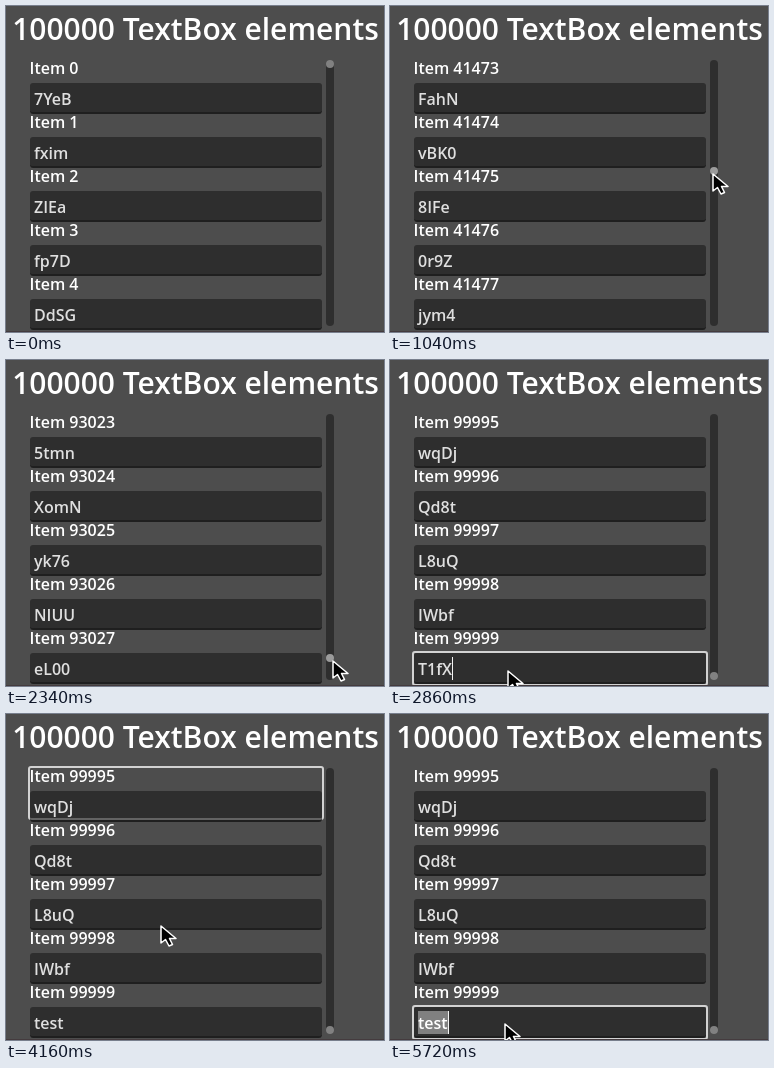
Write an HTML page that moves like this. It is 378 px wide and 326 px high and loops after 5980 ms.

```html
<!DOCTYPE html>
<html lang="en">
<head>
<meta charset="utf-8">
<title>100000 TextBox elements</title>
<style>
  html, body { margin: 0; width: 100%; height: 100%; overflow: hidden; background: #4d4d4d; }
  svg { display: block; width: 378px; height: 326px; }
  text { font: 600 16px "Open Sans", "Noto Sans", sans-serif; fill: #fff; white-space: pre; }
  .title { font-size: 30px; text-anchor: middle; }
  .value { fill: #dfdfdf; }
  .field { fill: rgba(26, 26, 26, .6); }
  .edge { fill: rgba(0, 0, 0, .6); }
  .focus { fill: none; stroke: rgba(255, 255, 255, .75); stroke-width: 2; }
  .mark { fill: #808080; }
  .caret { fill: #f2f2f2; }
  .mouse { fill: #000; stroke: #fff; stroke-width: 1.5; stroke-linejoin: round; }
</style>
</head>
<body>
<svg id="stage" viewBox="0 0 378 326"></svg>
<script>
const STEP = 260, ROWS = 5, PITCH = 54, LAST = 99999;
const stage = document.getElementById('stage');

function add(tag, attrs, parent = stage) {
  const el = document.createElementNS('http://www.w3.org/2000/svg', tag);
  for (const key in attrs) el.setAttribute(key, attrs[key]);
  return parent.appendChild(el);
}
const show = (el, on) => el.setAttribute('visibility', on ? 'visible' : 'hidden');

// Known contents, keyed by the first item of each run.
const contents = {};
Object.entries({
  0: '7YeB fxim ZIEa fp7D DdSG',
  41473: 'FahN vBK0 8IFe 0r9Z jym4',
  62403: 'vBxf Vkxf k0MQ apfl tmll',
  93023: '5tmn XomN yk76 NIUU eL00',
  99993: 'Br2m Rqy1 wqDj Qd8t L8uQ IWbf'
}).forEach(([first, words]) =>
  words.split(' ').forEach((word, i) => contents[+first + i] = word));

const CHARS = 'ABCDEFGHIJKLMNOPQRSTUVWXYZabcdefghijklmnopqrstuvwxyz0123456789';
function contentOf(item) {
  if (contents[item]) return contents[item];
  let seed = item * 7919 + 17, word = '';
  for (let i = 0; i < 4; i++) {
    seed = (Math.imul(seed, 1664525) + 1013904223) >>> 0;
    word += CHARS[(seed >>> 16) % CHARS.length];
  }
  return word;
}

// One entry per step: top item, pointer, focused row, and editing state.
const drag = (top, x, y) => ({ top, x, y, drag: true });
const keys = (top, row) => ({ top, x: 155, y: 212, row });
const edit = (x, y, extra) => ({ top: 99995, x, y, edit: true, ...extra });
const steps = [
  { top: 0 },
  drag(8914, 323, 79),
  drag(19767, 323, 108),
  drag(30620, 323, 138),
  drag(41473, 323, 168),
  drag(51938, 324, 201),
  drag(62403, 324, 234),
  drag(73256, 325, 258),
  drag(83721, 326, 281),
  drag(93023, 327, 301),
  drag(99995, 328, 318),
  edit(118, 311),
  edit(118, 311, { typed: 'te' }),
  edit(118, 311, { typed: 'test' }),
  keys(99995, 3),
  keys(99995, 1),
  keys(99995, 0),
  keys(99993, 1),
  keys(99993, 3),
  keys(99993, 4),
  keys(99995, 4),
  edit(115, 310),
  edit(115, 310, { marked: true })
];
const TYPED_AT = steps.findIndex(s => s.typed === 'test');

add('text', { x: 189.5, y: 34, class: 'title' }).textContent = '100000 TextBox elements';

function makeRow(i) {
  const g = add('g', { transform: `translate(0 ${i * PITCH})` });
  const ring = (y, height) =>
    add('rect', { x: 23, y, width: 294, height, rx: 2, class: 'focus' }, g);
  const row = { ring: ring(53, 52) };
  row.label = add('text', { x: 23.5, y: 68 }, g);
  add('path', { d: 'M24 106V80a3 3 0 0 1 3-3H313a3 3 0 0 1 3 3V106Z', class: 'field' }, g);
  add('path', { d: 'M24 105.5q.5 2.5 3 2.5H313q2.5 0 3-2.5L314 106H26Z', class: 'edge' }, g);
  row.mark = add('rect', { x: 28, y: 81, width: 0, height: 23, class: 'mark' }, g);
  row.value = add('text', { x: 28, y: 99, class: 'value' }, g);
  row.caret = add('rect', { y: 81, width: 1, height: 23, class: 'caret' }, g);
  row.editRing = ring(76, 33);
  return row;
}
const rows = Array.from({ length: ROWS }, (_, i) => makeRow(i));

add('rect', { x: 320, y: 54, width: 8, height: 266, rx: 4, class: 'field' });
const knob = add('circle', { cx: 324, r: 4, fill: '#fff' });
add('rect', { y: 325, width: 378, height: 1, fill: '#443b3e' });
const mouse = add('path', {
  d: 'M0 0V17L4.5 13.5L8 20L11.5 18.5L8.5 12.5H15Z', class: 'mouse'
});

function draw(n) {
  const s = steps[n];
  rows.forEach((row, i) => {
    const item = s.top + i;
    const editing = !!s.edit && i === ROWS - 1;
    const word = item === LAST
      ? s.typed || (n >= TYPED_AT ? 'test' : contentOf(item))
      : contentOf(item);
    row.label.textContent = 'Item ' + item;
    row.value.textContent = word;
    row.value.style.fill = editing && s.marked ? '#fff' : '';
    show(row.ring, s.row === i);
    show(row.editRing, editing);
    show(row.caret, editing);
    show(row.mark, editing && s.marked);
    if (editing) {
      const width = Math.round(row.value.getComputedTextLength());
      row.mark.setAttribute('width', width);
      row.caret.setAttribute('x', 28 + width);
    }
  });
  knob.setAttribute('cy', 58 + 258 * s.top / 99995);
  knob.setAttribute('fill-opacity', s.drag ? .52 : .4);
  show(mouse, s.x !== undefined);
  if (s.x !== undefined) mouse.setAttribute('transform', `translate(${s.x} ${s.y})`);
}

const start = performance.now();
let current = -1;
function tick() {
  const n = Math.floor((performance.now() - start) / STEP) % steps.length;
  if (n !== current) draw(current = n);
  requestAnimationFrame(tick);
}
tick();
</script>
</body>
</html>
```
